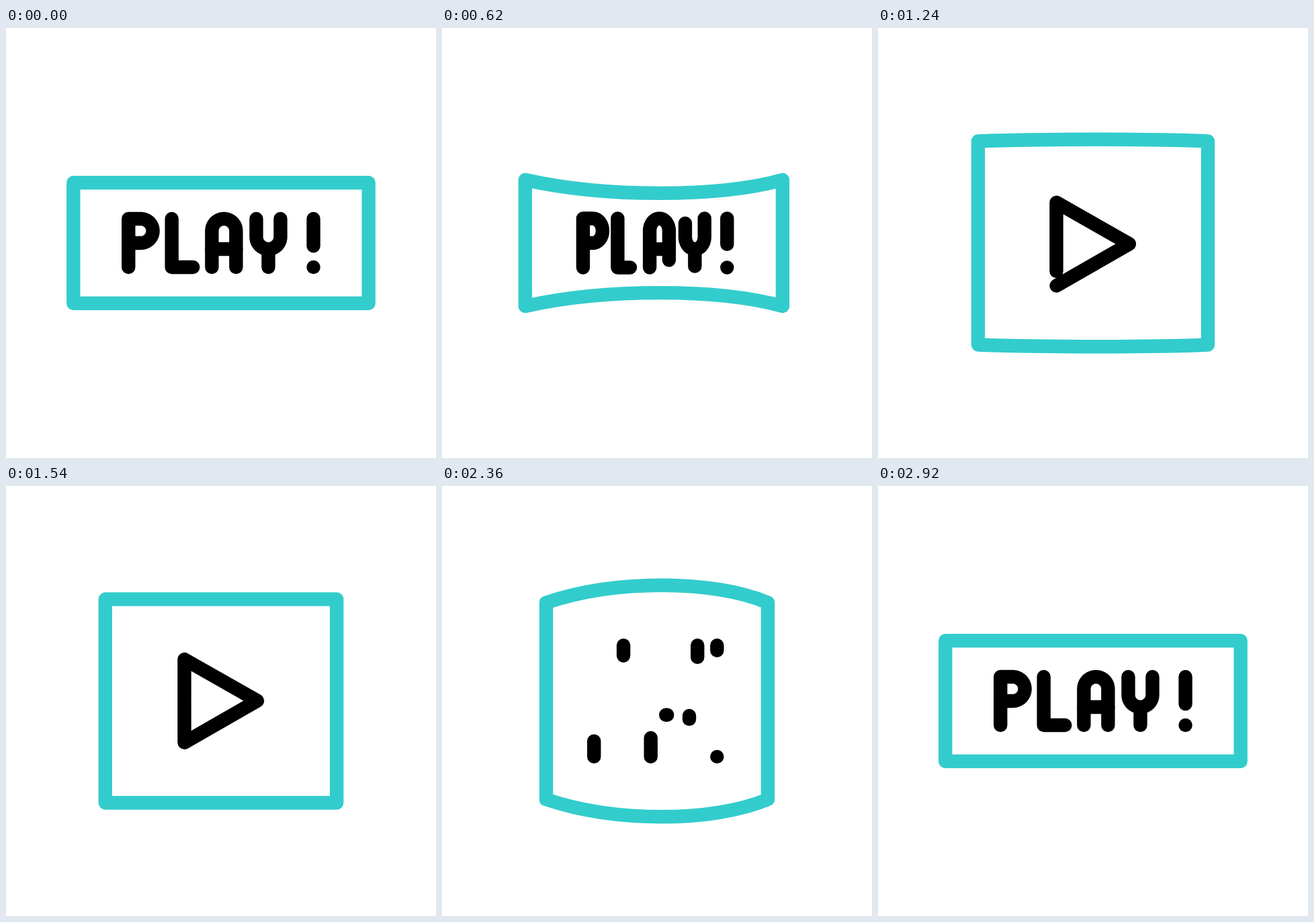
Write an HTML page with a canvas that moves like this. It is 640x640 px and loops after 3600 ms.

```html
<!DOCTYPE html>
<html lang="en">
<head>
<meta charset="utf-8">
<title>Play button</title>
<style>
html, body { margin: 0; width: 100%; height: 100%; overflow: hidden; background: #fff; }
canvas { display: block; width: 100vmin; height: 100vmin; }
</style>
</head>
<body>
<canvas id="stage" width="640" height="640"></canvas>
<script>
const ctx = document.getElementById('stage').getContext('2d');
const LOOP = 3600, MID = 320, LINE = 20.4;
const TEAL = '#33cccc', INK = '#000';

// Frame edges, half height and bow of its long sides; text scale; x of the "!".
const POSES = {
  wide:  { l: 100.3, r: 539.7, h: 89.8,  bow: 0,     sx: 1,    sy: 1,    bang: 137.6 },
  pinch: { l: 121.2, r: 508.9, h: 89.8,  bow: -23.4, sx: 0.81, sy: 0.91, bang: 105.7 },
  bulge: { l: 160,   r: 480,   h: 151.5, bow: 28.2,  sx: 0.652, sy: 2.42, bang: 85 },
  box:   { l: 147.8, r: 492.2, h: 151.5, bow: 0,     sx: 0.652, sy: 2.42, bang: 85 }
};

const clamp = u => Math.min(1, Math.max(0, u));
const span = (t, a, b) => clamp((t - a) / (b - a));
const smooth = u => u * u * (3 - 2 * u);
const smoother = u => u * u * u * (u * (6 * u - 15) + 10);
const easeIn = u => Math.pow(u, 2.5);
const easeOut = u => 1 - Math.pow(1 - u, 3);

function mix(a, b, k) {
  const p = {};
  for (const key in a) p[key] = a[key] + (b[key] - a[key]) * k;
  return p;
}

// Points on a circle, angles in quarter turns.
function arc(cx, cy, r, from, to) {
  const pts = [], n = 24;
  for (let i = 0; i <= n; i++) {
    const a = (from + (to - from) * i / n) * Math.PI / 2;
    pts.push([cx + r * Math.cos(a), cy + r * Math.sin(a)]);
  }
  return pts;
}

// Letter strokes, relative to the centre of the stage.
const TOP = -36, BASE = 36, R = 18;
const LETTERS = [
  [[-137.7, BASE], [-137.7, TOP], ...arc(-119.4, TOP + R, R, -1, 1), [-137.7, 0]],
  [[-73.3, TOP], [-73.3, BASE], [-41.7, BASE]],
  [[-13.6, BASE], ...arc(4.4, TOP + R, R, -2, 0), [22.4, BASE]],
  [[22.4, 9], [-13.6, 9]],
  [[88.5, TOP], ...arc(70.5, -9, R, 0, 2), [52.5, TOP]],
  [[70.5, 9.5], [70.5, BASE]]
];
const BANG = [[[0, TOP], [0, 4.4]], [[0, BASE], [0, BASE + 0.01]]];
const TRIANGLE = [[-54.5, 61.8], [54, -0.3], [-54.5, -62], [-54.5, 61.8]];

// Strokes the part of a polyline between two fractions of its length.
function strokePart(pts, from, to) {
  if (to <= from) return;
  const lens = pts.slice(1).map((p, i) => Math.hypot(p[0] - pts[i][0], p[1] - pts[i][1]));
  const total = lens.reduce((a, b) => a + b, 0);
  const start = from * total, end = to * total;
  const closed = from === 0 && to === 1 && pts === TRIANGLE;
  let done = 0, drawing = false;
  ctx.beginPath();
  lens.forEach((len, i) => {
    const a = Math.max(start, done), b = Math.min(end, done + len);
    if (len > 0 && b > a) {
      const at = d => pts[i].map((v, k) => MID + v + (pts[i + 1][k] - v) * (d - done) / len);
      if (!drawing) ctx.moveTo(...at(a));
      ctx.lineTo(...at(b));
      drawing = true;
    }
    done += len;
  });
  if (closed) ctx.closePath();
  ctx.stroke();
}

function drawFrame({ l, r, h, bow }) {
  const w = r - l, top = MID - h, bottom = MID + h, d = bow / 0.75;
  const c1 = l + 0.31 * w, c2 = r - 0.25 * w;
  ctx.strokeStyle = TEAL;
  ctx.beginPath();
  ctx.moveTo(l, top);
  ctx.bezierCurveTo(c1, top - d, c2, top - d, r, top);
  ctx.lineTo(r, bottom);
  ctx.bezierCurveTo(c2, bottom + d, c1, bottom + d, l, bottom);
  ctx.closePath();
  ctx.stroke();
}

function drawText({ sx, sy, bang }, shown) {
  ctx.strokeStyle = INK;
  for (const s of LETTERS) strokePart(s.map(([x, y]) => [x * sx, y * sy]), 0, shown);
  for (const s of BANG) strokePart(s.map(([x, y]) => [bang + x, y * sy]), 0, shown);
}

function drawTriangle(from, to, drop) {
  ctx.strokeStyle = INK;
  const pts = drop ? TRIANGLE.map(([x, y]) => [x, y + drop]) : TRIANGLE;
  strokePart(pts, from, to);
}

function poseAt(t) {
  const { wide, pinch, bulge, box } = POSES;
  if (t < 482) return mix(wide, pinch, smooth(span(t, 200, 482)));
  if (t < 890) return mix(pinch, bulge, easeIn(span(t, 482, 890)));
  if (t < 1820) return mix(bulge, box, easeOut(span(t, 890, 1540)));
  if (t < 2195) return mix(box, bulge, smooth(Math.pow(span(t, 1820, 2195), 0.83)));
  return mix(bulge, wide, smoother(span(t, 2195, 2920)));
}

function draw(t) {
  const pose = poseAt(t);
  ctx.fillStyle = '#fff';
  ctx.fillRect(0, 0, 640, 640);
  ctx.lineWidth = LINE;
  ctx.lineCap = ctx.lineJoin = 'round';
  drawFrame(pose);

  if (t < 890) drawText(pose, 1 - easeIn(span(t, 482, 890)));
  else if (t > 2195) drawText(pose, smoother(span(t, 2195, 2920)));

  if (t > 766 && t < 1820) {
    const k = easeOut(span(t, 766, 1540));
    drawTriangle(0, k, 30 * (1 - k));
  } else if (t >= 1820 && t < 2070) {
    const k = smooth(span(t, 1820, 2070));
    drawTriangle(0.004 * k, 1 - k, 0);
  }
}

const begin = performance.now();
function tick() {
  draw((performance.now() - begin) % LOOP);
  requestAnimationFrame(tick);
}
tick();
</script>
</body>
</html>
```
